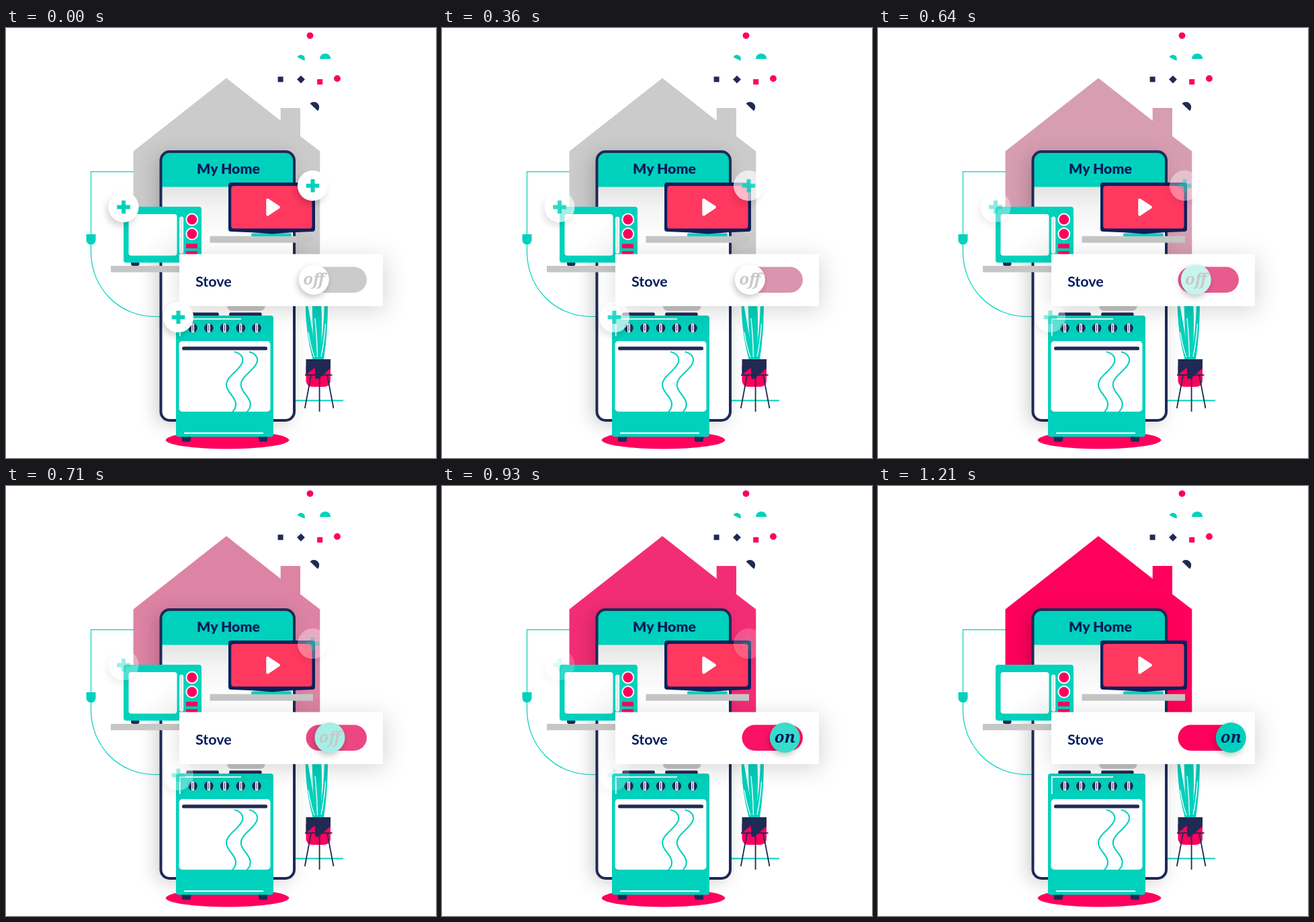
These frames come from a looping animation (640 by 640 pixels, 1.78 s). An HTML page:

```html
<!DOCTYPE html>
<html lang="en">
<head>
<meta charset="utf-8">
<title>My Home</title>
<style>
html, body { margin: 0; width: 100%; height: 100%; overflow: hidden; background: #fff; }
svg { display: block; width: 100%; height: 100%; }
.teal { fill: #00d1bc; }
.pink { fill: #ff005c; }
.navy { fill: #1f2a55; }
.white { fill: #fff; }
.shelf { fill: #c6c6c6; }
.line { fill: none; stroke: #00d1bc; }
.label { font-family: Lato, sans-serif; fill: #051c5c; }
.state { font: italic 700 24px "Noto Serif", serif; text-anchor: middle; }
#phone { filter: drop-shadow(-6px 5px 14px rgba(0,0,0,.2)); }
#card { filter: drop-shadow(3px 6px 17px rgba(0,0,0,.16)); }
#disc { filter: drop-shadow(-2px 4px 4px rgba(0,0,0,.22)); }
.badge circle { filter: drop-shadow(-3px 6px 5px rgba(0,0,0,.16)); }
</style>
</head>
<body>
<svg viewBox="0 0 640 640">
  <defs>
    <linearGradient id="shade" x2="0" y2="1">
      <stop stop-color="#e3e3e3"/>
      <stop offset=".4" stop-color="#f4f4f4"/>
      <stop offset="1" stop-color="#fff"/>
    </linearGradient>
    <linearGradient id="glass" x2="1" y2="1">
      <stop offset=".5" stop-color="#fff"/>
      <stop offset="1" stop-color="#f3f3f3"/>
    </linearGradient>
  </defs>

  <g id="confetti">
    <circle class="pink" cx="452.5" cy="11.3" r="4.9"/>
    <circle class="pink" cx="493" cy="75.2" r="4.9"/>
    <path class="teal" d="M467 46a8.1 8.1 0 0 1 16.2 0z"/>
    <path class="teal" d="M433.5 43.2A6 6 0 0 1 444.2 48.7z"/>
    <rect class="navy" x="404.6" y="72.4" width="8" height="8"/>
    <path class="navy" d="M439 70.7l5.9 5.9-5.9 5.9-5.9-5.9z"/>
    <rect class="pink" x="463.2" y="76.2" width="8" height="8"/>
    <path class="navy" d="M452.6 112.4A7.9 7.9 0 0 1 464 123.5z"/>
  </g>

  <g id="cord">
    <path class="line" stroke-width="1.2" d="M192 213.8H126.5V307M126.5 322V333C126.5 387 168 429.5 222 429.5H256"/>
    <path class="teal" d="M119.5 307h14v8.5a7 7 0 0 1-14 0z"/>
  </g>

  <path id="house" d="M189.5 183.5L328 74.5 408.7 138V119H438v42l29.3 22.5V348H189.5z"/>

  <path class="line" stroke-width="2" d="M430 554.5H502"/>
  <g id="phone">
    <rect class="white" x="230.5" y="184" width="198.5" height="400" rx="13"/>
  </g>
  <rect x="231" y="236" width="198" height="80" fill="url(#shade)"/>
  <path class="teal" d="M231 236.5V197a13 13 0 0 1 13-13H416a13 13 0 0 1 13 13V236.5z"/>
  <rect x="230.5" y="184" width="198.5" height="400" rx="13" fill="none" stroke="#1f2a55" stroke-width="4"/>
  <text class="label" x="331" y="217.3" font-size="21.2" font-weight="900" text-anchor="middle">My Home</text>

  <g id="microwave">
    <rect class="shelf" x="156" y="354" width="110" height="9.5"/>
    <rect class="navy" x="186" y="347" width="12.5" height="7" rx="3"/>
    <rect class="teal" x="175" y="266" width="116" height="83.3" rx="4"/>
    <rect x="182.5" y="277" width="72" height="61.8" rx="4" fill="url(#glass)"/>
    <rect x="258.8" y="281.5" width="4.6" height="53.5" rx="2.3" fill="#c9f5f0" stroke="#fff" stroke-width="1.4"/>
    <g class="pink" stroke="#fff" stroke-width="2">
      <circle cx="276.8" cy="285" r="8.4"/>
      <circle cx="276.8" cy="306.4" r="8.4"/>
    </g>
    <rect class="pink" x="268" y="321.3" width="17" height="6.6"/>
    <rect class="pink" x="268" y="332.3" width="17" height="6.6"/>
  </g>

  <g id="tv">
    <rect class="shelf" x="303.5" y="309.7" width="153.5" height="10"/>
    <rect class="teal" x="365" y="305.5" width="60" height="4.5" rx="1.5"/>
    <path d="M335 230H456a4 4 0 0 1 4 4V299a4 4 0 0 1-4 4Q425 303.5 396 306.5 366 303.5 335 303a4 4 0 0 1-4-4V234a4 4 0 0 1 4-4z" fill="#0c1f5b"/>
    <rect x="335.2" y="235" width="120.3" height="63.5" rx="4" fill="#ff3860"/>
    <path class="white" d="M389.5 256L405.5 266.7 389.5 277.5z" stroke="#fff" stroke-width="4.5" stroke-linejoin="round"/>
  </g>

  <g id="plant">
    <g class="teal">
      <path d="M445.5 408H448.5Q455 445 463.5 493H456.5Q446 455 445.5 408z"/>
      <path d="M456 408H469Q472 455 467 493H461Q455 450 456 408z"/>
      <path d="M474 408H479Q479 455 473 493H465Q473 455 474 408z"/>
    </g>
    <path d="M450 453Q453 474 459 490M460 432Q463 462 463.5 490M475.5 440Q474 466 469 489" fill="none" stroke="#fff" stroke-width="1.3"/>
    <path class="pink" d="M446.5 503H483V525a9 9 0 0 1-9 9H455.5a9 9 0 0 1-9-9z"/>
    <path class="navy" d="M446.5 493H483V506.5L465 522H460.5L459.5 505.5 446.5 516.5z"/>
    <path d="M445 516.5H485.5M454 517L444.8 566M466.6 517V571M478.2 517L487.5 566" fill="none" stroke="#1f2a55" stroke-width="1.8"/>
  </g>

  <g id="stove">
    <ellipse class="pink" cx="329.5" cy="613.2" rx="91.7" ry="13.2"/>
    <rect class="navy" x="262" y="604" width="13" height="11.8" rx="2.5"/>
    <rect class="navy" x="376" y="604" width="13" height="11.8" rx="2.5"/>
    <rect x="329" y="400" width="56.5" height="21" rx="7" fill="#c6c6c6"/>
    <rect class="navy" x="268.3" y="423.4" width="48.4" height="7" rx="2"/>
    <rect class="navy" x="332.2" y="423.4" width="48.4" height="7" rx="2"/>
    <rect class="teal" x="253" y="428" width="145" height="180.5" rx="4"/>
    <path d="M258.7 458.5V433.2H350M265 603H383" fill="none" stroke="#fff" stroke-width="1.8"/>
    <g id="dials"></g>
    <rect class="white" x="257.5" y="466" width="136" height="105" rx="5"/>
    <rect class="navy" x="262" y="474.2" width="127" height="5.4" rx="2.7"/>
    <g class="line" stroke-width="2.1">
      <path id="steam" d="M340 482C349 484 354 490 352 497C349 509 328 518 328 531C328 543 342 548 342 560Q342 567 337 571"/>
      <use href="#steam" x="21.7"/>
    </g>
  </g>

  <rect id="card" class="white" x="258" y="336.5" width="303" height="77.5"/>
  <text class="label" x="282" y="385.3" font-size="21.5" font-weight="700">Stove</text>
  <rect id="track" x="446.5" y="355.5" width="90.5" height="38.5" rx="19.25"/>
  <g id="knob">
    <circle id="disc" cy="374.5" r="22.5"/>
    <text id="word" class="state" y="381.5"></text>
  </g>

  <g id="badges"></g>
</svg>
<script>
const $ = id => document.getElementById(id);
const LOOP = 1780, LAST = 17;
const GREY = [203, 203, 203], PINK = [255, 0, 92], WHITE = [255, 255, 255], TEAL = [0, 209, 188];

// [step, track tint, badge disc opacity, badge plus opacity]
const KEYS = [
  [0, 0, 1, 1],
  [3, .12, .86, .97],
  [7, .41, .45, .65],
  [9, .55, .37, .46],
  [11, .75, .3, .32],
  [13, .91, .19, .14],
  [16, .99, .04, .03],
  [17, 1, 0, 0]
];

$('dials').innerHTML = [278, 301.8, 325.5, 349.3, 373].map(x =>
  `<circle class="navy" cx="${x}" cy="446.6" r="6.8"/>
   <rect class="white" x="${x - 2.1}" y="440" width="4.2" height="13.2" rx="1"/>
   <path d="M${x} 441.5v10" stroke="#1f2a55"/>`).join('');

$('badges').innerHTML = [[175, 266.5], [456.5, 234.7], [256.5, 430.5]].map(([x, y]) =>
  `<g class="badge" transform="translate(${x} ${y})">
     <circle class="white" r="22.6"/>
     <path d="M-9.8 0H9.8M0-9.8V9.8" fill="none"/>
   </g>`).join('');

const discs = document.querySelectorAll('.badge circle');
const pluses = document.querySelectorAll('.badge path');
// one compound outline keeps the crossing even while it fades
pluses.forEach(p => {
  p.setAttribute('d', 'M-3-9.8H3V-3H9.8V3H3V9.8H-3V3H-9.8V-3H-3z');
  p.setAttribute('class', 'teal');
  p.removeAttribute('fill');
});

const lerp = (a, b, k) => a + (b - a) * k;
const mix = (a, b, k) => `rgb(${a.map((v, i) => Math.round(lerp(v, b[i], k)))})`;

function ease(u) {
  u = Math.min(1, Math.max(0, u));
  const a = u ** 1.8, b = (1 - u) ** 1.8;
  return a / (a + b);
}

function sample(step, col) {
  const n = Math.max(1, KEYS.findIndex(k => k[0] >= step));
  const a = KEYS[n - 1], b = KEYS[n];
  return lerp(a[col], b[col], (step - a[0]) / (b[0] - a[0]));
}

// Steps last 70 ms, with an extra 10 ms after the 4th and the 11th.
function stepAt(t) {
  if (t >= 290) t -= 10;
  if (t >= 780) t -= 10;
  return Math.min(LAST, Math.floor(t / 70));
}

function draw(t) {
  const step = stepAt(t);
  const k = ease((step - 5) / 12);
  const on = step >= 11;
  $('house').style.fill = mix(GREY, PINK, k);
  $('track').style.fill = mix(GREY, PINK, sample(step, 1));
  $('disc').style.fill = mix(WHITE, TEAL, k);
  $('knob').setAttribute('transform', `translate(${lerp(458.3, 525.3, k)} 0)`);
  $('word').textContent = on ? 'on' : 'off';
  $('word').style.fill = on ? '#051c5c' : '#c8c8c8';
  discs.forEach(d => d.style.opacity = sample(step, 2));
  pluses.forEach(p => p.style.opacity = sample(step, 3));
}

const start = performance.now();
function tick() {
  draw((performance.now() - start) % LOOP);
  requestAnimationFrame(tick);
}
tick();
</script>
</body>
</html>
```
